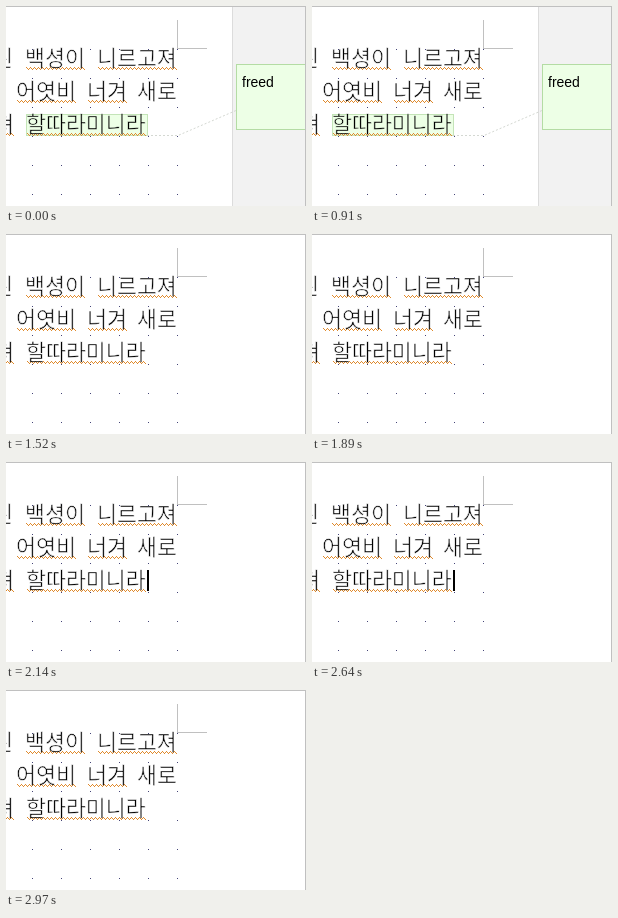
Write an HTML page with a canvas that moves like this. It is 300 px wide and 200 px high and loops after 3.45 s.

```html
<!DOCTYPE html>
<html lang="ko">
<head>
<meta charset="utf-8">
<style>
html, body { margin: 0; width: 100%; height: 100%; overflow: hidden; background: #fff; }
canvas { display: block; }
</style>
</head>
<body>
<canvas id="page" width="300" height="200"></canvas>
<script>
const ctx = document.getElementById('page').getContext('2d');
const LOOP = 3450, NOTE_END = 1520, CARET_ON = 2140, CARET_OFF = 2970;
const LINE = '#c0c0c0';

// [text, x, baseline, underlined]
const words = [
  ['된', -13, 60, false], ['백셩이', 19, 60, true], ['니르고져', 91, 60, true],
  ['어엿비', 10, 93, true], ['너겨', 81, 93, true], ['새로', 131, 93, false],
  ['져', -12, 126, true], ['할따라미니라', 20, 126, true]
];

function rect(x, y, w, h, color) {
  ctx.fillStyle = color;
  ctx.fillRect(x, y, w, h);
}

function frame(x, y, w, h, fill, edge) {
  rect(x, y, w, h, edge);
  rect(x + 1, y + 1, w - 2, h - 2, fill);
}

function zigzag(x, y, w) {
  for (let i = 0; i < w; i++) rect(x + i, y + [0, 1, 2, 1][i % 4], 1, 1, '#e08a2c');
}

function drawGrid() {
  for (let y = 43; y < 200; y += 29)
    for (let x = 26; x <= 171; x += 29) rect(x, y, 1, 1, '#447');
}

// The outline is cut away on a separate layer to get thin strokes.
function makeTextLayer() {
  const layer = document.createElement('canvas');
  layer.width = 300;
  layer.height = 200;
  const pen = layer.getContext('2d');
  pen.font = '300 21.7px "Noto Sans CJK KR", "Noto Sans CJK", sans-serif';
  pen.lineWidth = 0.65;
  pen.lineJoin = 'round';
  for (const [text, x, y] of words) pen.fillText(text, x, y);
  pen.globalCompositeOperation = 'destination-out';
  for (const [text, x, y] of words) pen.strokeText(text, x, y);
  return layer;
}

function drawText() {
  for (const [text, x, y, marked] of words)
    if (marked) zigzag(x + 1, y + 1, text.length * 20 - 1);
  ctx.drawImage(textLayer, 0, 0);
}

function drawConnector() {
  ctx.strokeStyle = '#d4d8d2';
  ctx.lineWidth = 1;
  ctx.setLineDash([2, 2]);
  ctx.beginPath();
  ctx.moveTo(141, 129.5);
  ctx.lineTo(172, 129.5);
  ctx.lineTo(230, 104.5);
  ctx.stroke();
  ctx.setLineDash([]);
}

function drawNote() {
  rect(226, 0, 74, 200, '#f2f2f2');
  rect(226, 0, 1, 200, '#dcdcdc');
  drawConnector();
  frame(230, 58, 71, 66, '#edffe6', '#b4dca4');
  ctx.font = '14px "Liberation Sans", Arial, sans-serif';
  ctx.fillStyle = '#000';
  ctx.fillText('freed', 236, 81);
}

function draw(t) {
  const noted = t < NOTE_END;
  rect(0, 0, 300, 200, '#fff');
  if (noted) frame(20, 108, 122, 22, '#edffe6', '#c4e4b8');
  drawGrid();
  rect(171, 14, 1, 29, LINE);
  rect(171, 42, 30, 1, LINE);
  drawText();
  if (noted) drawNote();
  rect(0, 0, 300, 1, LINE);
  rect(299, 0, 1, 200, LINE);
  if (t >= CARET_ON && t < CARET_OFF) rect(141, 108, 2, 21, '#000');
}

const textLayer = makeTextLayer();
const start = performance.now();
function tick() {
  draw((performance.now() - start) % LOOP);
  requestAnimationFrame(tick);
}
tick();
</script>
</body>
</html>
```
